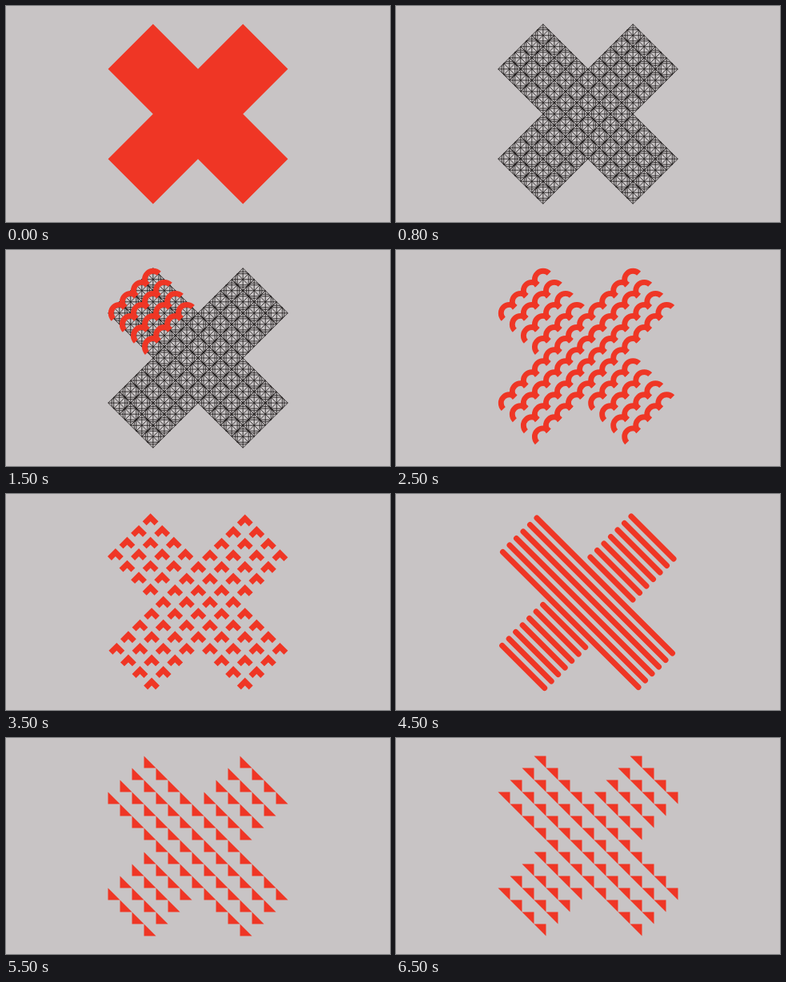
Recreate the animation shown at these times as an HTML page without scripts. Size 480 by 270 pixels, loop 7 s.

```html
<!DOCTYPE html>
<html lang="en">
<head>
<meta charset="utf-8">
<title>Cross patterns</title>
<style>
  html, body { margin: 0; width: 100%; height: 100%; overflow: hidden; background: #c8c4c5; }
  svg { display: block; width: 100%; height: 100%; fill: #ef3625; }
  marker { overflow: visible; }

  /* each slide takes one half-second turn, --k is its place in the loop */
  .slide { visibility: hidden; animation: turn 7s step-end calc(var(--k) * .5s) infinite; }
  @keyframes turn {
    0% { visibility: visible; }
    7.142857%, 100% { visibility: hidden; }
  }

  /* the shape repeated on every cell */
  .mesh { marker: url(#mesh); }
  .arc { marker: url(#arc); }
  .heart { marker: url(#heart); }
  .dot { marker: url(#dot); }
  .wedge { marker: url(#wedge); }
  .lines { fill: none; stroke: #ef3625; stroke-width: 7; stroke-linecap: round; }
</style>
</head>
<body>
<svg viewBox="0 0 480 270">
  <defs>
    <!-- shapes, one unit = half a cell diagonal -->
    <marker id="mesh" markerUnits="userSpaceOnUse" markerWidth="1" markerHeight="1">
      <g fill="none" stroke="#1c1819" stroke-width=".06">
        <path d="M0-1L1 0 0 1-1 0zM-1 0H1M0-1V1M-.5-.5L.5 .5M.5-.5L-.5 .5M-.5-.5H.5V.5H-.5z"/>
        <circle r=".7"/>
      </g>
    </marker>
    <marker id="arc" markerUnits="userSpaceOnUse" markerWidth="1" markerHeight="1">
      <path d="M-.707 .707A1 1 0 0 1 .707-.707L.354-.354A.5 .5 0 0 0-.354 .354z"/>
    </marker>
    <marker id="heart" markerUnits="userSpaceOnUse" markerWidth="1" markerHeight="1">
      <path d="M-.68-.17l.34-.34 .34 .34 .34-.34 .34 .34-.68 .68z"/>
    </marker>
    <marker id="dot" markerUnits="userSpaceOnUse" markerWidth="1" markerHeight="1">
      <circle r=".375"/>
    </marker>
    <marker id="wedge" markerUnits="userSpaceOnUse" markerWidth="1" markerHeight="1">
      <path d="M-.5-.5H.5V.5z"/>
    </marker>

    <!-- 4 cells, 4 x 4 cells, then five blocks as a cross -->
    <path id="row" fill="none" d="M0 0l1 1 1 1 1 1"/>
    <g id="block">
      <use href="#row"/>
      <use href="#row" x="-1" y="1"/>
      <use href="#row" x="-2" y="2"/>
      <use href="#row" x="-3" y="3"/>
    </g>
    <use id="nw" href="#block" x="-4" y="-7"/>
    <use id="se" href="#block" x="4" y="1"/>
    <g id="rest">
      <use href="#nw"/>
      <use href="#block" x="4" y="-7"/>
      <use href="#block" y="-3"/>
      <use href="#block" x="-4" y="1"/>
    </g>
    <g id="cross">
      <use href="#rest"/>
      <use href="#se"/>
    </g>

    <g id="hearts" class="heart" transform="scale(14.58)">
      <use href="#rest"/>
      <use href="#se" x=".1" y=".08"/>
    </g>

    <path id="short" d="M133 81l53-53m-44.5 61.5l53-53m-44.5 61.5l53-53m-44.5 61.5l53-53m-44.5 61.5l53-53m-44.5 61.5l53-53m-44.5 61.5l53-53"/>
    <g id="lines" class="lines">
      <use href="#short"/>
      <path d="M134.5 199l169.5-169m-161 177.5l169.5-169m-161 177.5l169.5-169m-161 177.5l169.5-169m-161 177.5l169.5-169m-161 177.5l169.5-169"/>
      <use href="#short" x="110.3" y="110.5"/>
    </g>
  </defs>

  <g class="slide" style="--k:0">
    <path transform="translate(240 135) scale(56.2)" d="M-1-2l1 1 1-1 1 1-1 1 1 1-1 1-1-1-1 1-1-1 1-1-1-1z"/>
  </g>

  <!-- mesh filling up with arcs -->
  <g transform="translate(240 135) scale(14.04)">
    <g class="slide" style="--k:1"><use href="#cross" class="mesh"/></g>
    <g class="slide" style="--k:2">
      <use href="#cross" class="mesh"/>
      <path transform="translate(-4.04 -7)" d="M-.707 .707A1 1 0 0 1 .707-.707L.354-.354A.5 .5 0 0 0-.354 .354z"/>
    </g>
    <g class="slide" style="--k:3">
      <use href="#cross" class="mesh"/>
      <use href="#nw" class="arc"/>
    </g>
    <g class="slide" style="--k:4">
      <use href="#cross" class="mesh"/>
      <use href="#cross" class="arc"/>
    </g>
    <g class="slide" style="--k:5"><use href="#cross" class="arc"/></g>
  </g>

  <g class="slide" style="--k:6"><use href="#hearts" transform="translate(239.6 134.5)"/></g>
  <g class="slide" style="--k:7"><use href="#hearts" transform="translate(240.4 135) rotate(180)"/></g>

  <g class="slide" style="--k:8"><use href="#lines"/></g>
  <g class="slide" style="--k:9"><use href="#lines" transform="translate(480 0) scale(-1 1)"/></g>

  <g class="slide" style="--k:10">
    <use href="#cross" class="dot" transform="translate(240 135) scale(15.27)"/>
  </g>

  <!-- wedges turning into place -->
  <g transform="translate(240 135) scale(15)">
    <g class="slide" style="--k:11"><use href="#cross" class="wedge" transform="rotate(180)"/></g>
    <g class="slide" style="--k:12"><use href="#cross" class="wedge" transform="rotate(-90)"/></g>
    <g class="slide" style="--k:13"><use href="#cross" class="wedge"/></g>
  </g>
</svg>
</body>
</html>
```
